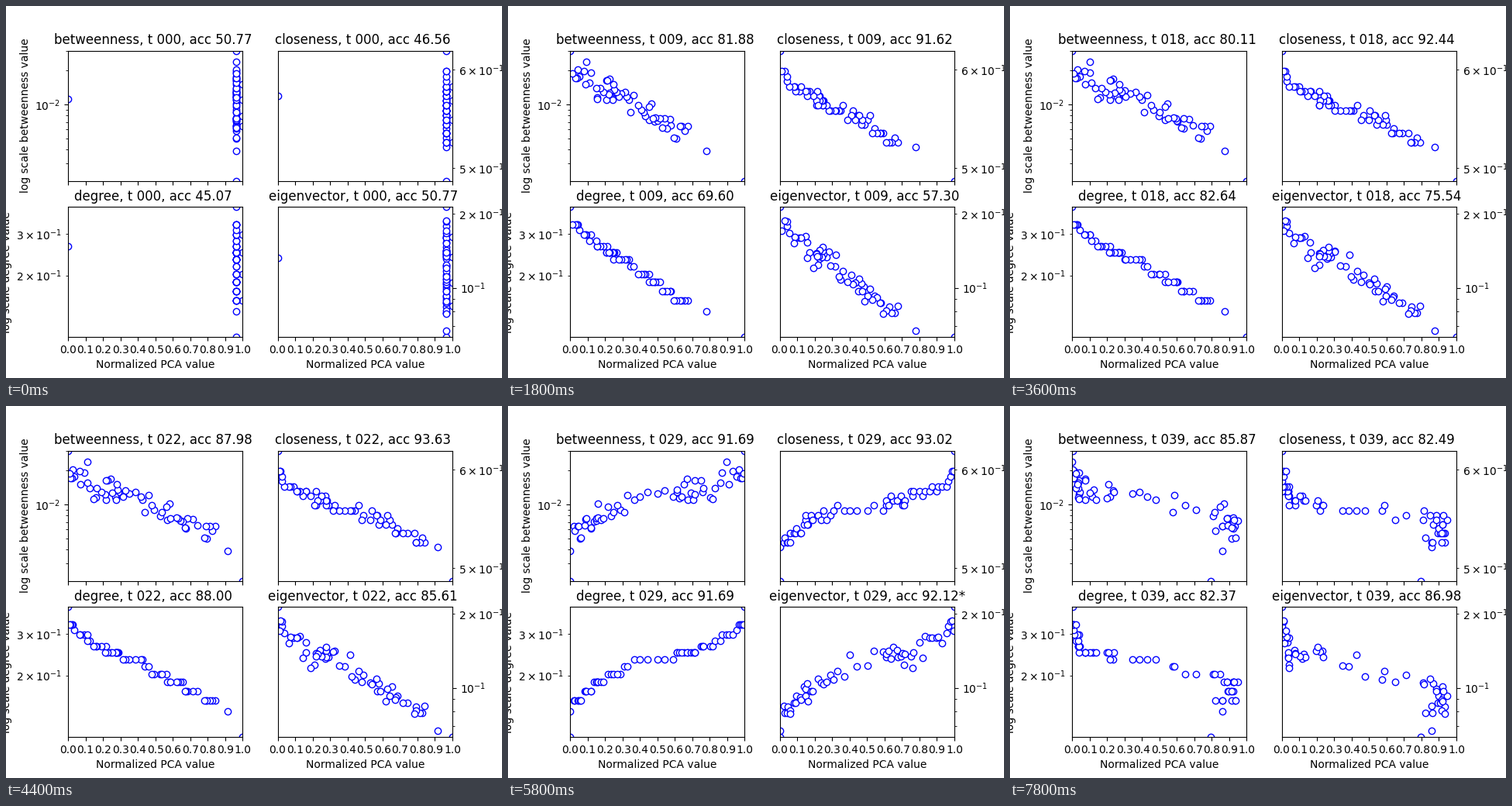
A matplotlib script that plays this animation: 640x480 px, repeating every 8 s.

```python
import numpy as np
import matplotlib.pyplot as plt
from matplotlib.animation import FuncAnimation

FRAMES = 40
FLIPPED = range(26, 33)    # steps where the component changes sign
rng = np.random.default_rng(4)

# Degrees of all nodes, from the periphery to the hub
degree = np.repeat([7, *range(9, 22), 25],
                   [1, 1, 6, 5, 7, 5, 2, 6, 11, 5, 2, 4, 1, 4, 1])
N = len(degree)


def power_law(at_16, exponent, spread):
    return at_16 * (degree / 16) ** exponent * np.exp(rng.normal(0, spread, N))


def pin(values, low, high):
    """Keep values inside the limits, with the end nodes exactly on them."""
    values = np.clip(values, low, high)
    values[0], values[-1] = low, high
    return values


# Most nodes are one or two hops away, a few are further
distance = 128 - degree + rng.integers(0, 3, N) + 2 * (degree < 12)
PANELS = {
    "betweenness": pin(power_law(0.0129, 1.75, 0.13), 0.0021, 0.0301),
    "closeness": pin(64 / distance, 64 / 131, 64 / 103),
    "degree": degree / 64,
    "eigenvector": pin(power_law(0.1325, 1.114, 0.06), 0.0630, 0.2139),
}

# PCA value along the node order at a few training steps
KNOTS = [0, 1, 2, 10, 19, 26, 32, 43, 56, 60]
STEPS = [5, 22, 29, 34, 39]
CURVES = [
    [1, .74, .62, .50, .42, .32, .25, .21, .06, 0],
    [1, .90, .84, .70, .57, .45, .30, .21, .03, 0],
    [1, 1, .98, .90, .80, .68, .41, .28, .03, 0],
    [.94, .98, .97, .92, .87, .65, .38, .19, .02, .01],
    [.785, .86, .88, .92, .90, .58, .20, .06, .02, .02],
]
JITTER = [.03, .03, .02, .05, .08]


def make_path(curve, jitter):
    x = np.interp(np.arange(N), KNOTS, curve)
    x += rng.normal(0, jitter, N) * np.sqrt(x * (1 - x))
    return np.clip(x, 0, 1)


paths = np.array([make_path(c, j) for c, j in zip(CURVES, JITTER)])

# Untrained state: nearly all nodes share one value
start = np.full(N, 0.9647)
start[48] = 0
start[[2, 21, 38, 53]] = 1


def positions(t):
    if t == 0:
        return start
    x = np.array([np.interp(t, STEPS, path) for path in paths.T])
    x **= 1 + 0.03 * max(0, 5 - t)
    return 1 - x if t in FLIPPED else x


# Accuracy at some steps, and the best step of each measure
SCORE_STEPS = [0, 5, 14, 22, 29, 34, 39]
SCORES = {
    "betweenness": [50.77, 89.59, 72.24, 87.98, 91.69, 89.85, 85.87],
    "closeness": [46.56, 91.93, 91.24, 93.63, 93.02, 90.13, 82.49],
    "degree": [45.07, 63.46, 77.28, 88.00, 91.69, 91.76, 82.37],
    "eigenvector": [50.77, 50.77, 65.47, 85.61, 92.12, 91.15, 86.98],
}
BEST = {"betweenness": (30, 92.05), "closeness": (25, 93.90),
        "degree": (32, 92.20), "eigenvector": (29, 92.12)}


def accuracy(name, t):
    keys = dict(zip(SCORE_STEPS, SCORES[name]))
    keys.update([BEST[name]])
    steps = sorted(keys)
    return np.interp(t, steps, [keys[s] for s in steps])


fig, grid = plt.subplots(2, 2, sharex="col", figsize=(6.4, 4.8), dpi=100)
dots = {}
for ax, (name, values) in zip(grid.flat, PANELS.items()):
    dots[name], = ax.plot(start, values, "bo", mfc="white")
    ax.set_yscale("log")
    ax.set_xlim(0, 1)
    ax.set_ylim(values.min(), values.max())
    ax.set_xticks(np.arange(11) / 10)
for ax, name in zip(grid[:, 0], ("betweenness", "degree")):
    ax.set_ylabel(f"log scale {name} value")
for ax in grid[:, 1]:
    ax.yaxis.tick_right()
for ax in grid[1]:
    ax.set_xlabel("Normalized PCA value")


def update(t):
    x = positions(t)
    for ax, name in zip(grid.flat, PANELS):
        dots[name].set_xdata(x)
        mark = "*" if t == BEST[name][0] else " "
        ax.set_title(f"{name}, t {t:03d}, acc {accuracy(name, t):.2f}{mark}")
    return list(dots.values())


anim = FuncAnimation(fig, update, frames=FRAMES, interval=200,
                     repeat=True, repeat_delay=0, blit=False)
plt.show()
```
